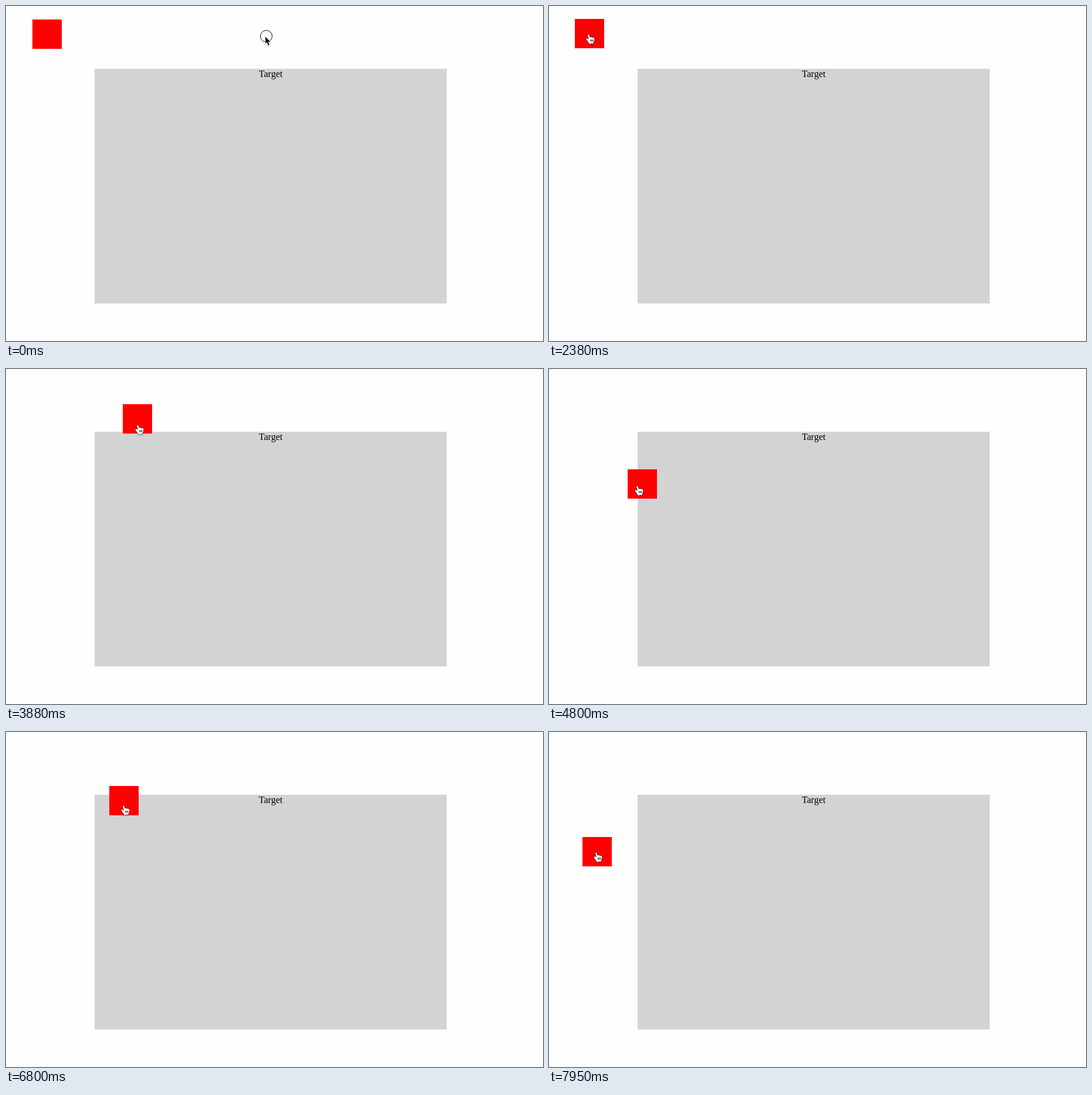
These frames come from a looping animation (915 px wide and 571 px high, 8000 ms). An HTML page with a canvas:

```html
<!DOCTYPE html>
<html lang="en">
<head>
<meta charset="utf-8">
<title>Drag and drop</title>
<style>
  html, body { margin: 0; width: 100%; height: 100%; overflow: hidden; background: #fefefe; }
  canvas { display: block; }
</style>
</head>
<body>
<canvas id="stage" width="915" height="571"></canvas>
<script>
const ctx = document.getElementById('stage').getContext('2d');
const LOOP = 8000;
const SIZE = 50;
const REST = { x: 45, y: 23 };
const GRIP = { x: 25, y: 26 };

// The pointer travels to the square, presses, picks it up, then drags it around.
const APPROACH = { start: 60, step: 59.3, count: 29 };
const PRESS = 2200, PICK_UP = 2380;
const DRAG = { start: 3020, step: 57.1 };

// Turning points of the drag: [step, x, y].
const turns = [
  [-1, 44, 22], [7, 114, 5], [12, 173, 26], [15, 199, 60], [22, 194, 116], [31, 134, 171],
  [38, 80, 162], [41, 70, 138], [46, 70, 80], [50, 83, 44], [57, 139, 26],
  [66, 176, 92], [72, 165, 133], [80, 95, 170], [86, 57, 179]
];

const arrow = new Path2D('M0 .5V12L2.6 9.6L4.9 15L6.9 14.2L4.6 8.9H8.4Z');
const hand = new Path2D('M-2.7 12.9L-3.9 10.9L-5.4 9Q-5.7 7-4.1 6.9Q-2.8 7.2-1.4 9.1L-1.7 6.8L-2.8 2.5Q-3 .7-1.7.6' +
  'Q-.6.6-.2 2.4L.5 5.4Q1.6 4 2.8 5.6Q4.6 4.4 5.5 6.3Q8.3 5.3 8.4 8L8 11.5L6.6 14V16.3L4 16L3.2 15L2 16.4H-.6L-1.2 14.8Z');
const creases = new Path2D('M1.8 9.2V12.6M3.8 9.2V12.6M5.8 9.2V12.4');

const clamp = (v, lo, hi) => Math.min(hi, Math.max(lo, v));
const stepAt = ({ start, step }, t) => Math.floor((t - start) / step);

function slope(i, axis) {
  const a = turns[i - 1], b = turns[i + 1];
  return a && b ? (b[axis] - a[axis]) / (b[0] - a[0]) : 0;
}

// Smooth curve through the turning points.
function dragPoint(step) {
  const last = turns.length - 1;
  const s = clamp(step, turns[0][0], turns[last][0]);
  const i = Math.max(1, turns.findIndex(p => p[0] >= s)) - 1;
  const a = turns[i], b = turns[i + 1];
  const span = b[0] - a[0], u = (s - a[0]) / span, v = 1 - u;
  const [x, y] = [1, 2].map(k => Math.round(
    v * v * (1 + 2 * u) * a[k] + u * u * (3 - 2 * u) * b[k] +
    span * u * v * (v * slope(i, k) - u * slope(i + 1, k))));
  return { x, y };
}

// Eased run to the left that dips and rises again near the end.
function approachPoint(t) {
  const u = clamp((stepAt(APPROACH, t) + 1) / APPROACH.count, 0, 1) ** 0.9;
  const e = u * u * (3 - 2 * u);
  return {
    x: Math.round(442 - 373 * e),
    y: Math.round(52 - 4 * e + 200 * e ** 6 * (1 - e))
  };
}

function ring(x, y) {
  ctx.beginPath();
  ctx.arc(x, y, 10, 0, Math.PI * 2);
  ctx.lineWidth = 1;
  ctx.strokeStyle = '#000';
  ctx.stroke();
}

function drawPointer({ x, y }, shape, fill, outline, width) {
  ctx.save();
  ctx.translate(x, y);
  ctx.lineJoin = 'round';
  ctx.lineWidth = width;
  ctx.strokeStyle = outline;
  ctx.fillStyle = fill;
  ctx.shadowColor = 'rgba(0,0,0,.35)';
  ctx.shadowBlur = 2;
  ctx.shadowOffsetY = 1;
  ctx.stroke(shape);
  ctx.shadowColor = 'transparent';
  ctx.fill(shape);
  if (shape === hand) ctx.stroke(creases);
  ctx.restore();
}

function draw(t) {
  const dragging = t >= PICK_UP;
  const step = Math.max(-1, stepAt(DRAG, t));
  const square = dragging ? dragPoint(step) : REST;
  let pointer = approachPoint(t);
  if (dragging) {
    // The square trails the pointer by one step.
    const ahead = dragPoint(step < 0 ? step : step + 1);
    pointer = { x: ahead.x + GRIP.x, y: ahead.y + GRIP.y };
  }

  ctx.fillStyle = '#fefefe';
  ctx.fillRect(0, 0, 915, 571);
  ctx.fillStyle = '#d3d3d3';
  ctx.fillRect(151, 107, 600, 400);
  ctx.fillStyle = '#000';
  ctx.font = '16px "Liberation Serif", serif';
  ctx.textAlign = 'center';
  ctx.fillText('Target', 451, 121);
  ctx.fillStyle = '#f00';
  ctx.fillRect(square.x, square.y, SIZE, SIZE);

  if (t < APPROACH.start) ring(443.5, 51.5);
  if (t >= PRESS && !dragging) ring(69.5, 46.5);

  const overSquare = pointer.x < square.x + SIZE && pointer.y < square.y + SIZE;
  if (dragging || overSquare) drawPointer(pointer, hand, '#fff', '#000', 1);
  else drawPointer(pointer, arrow, '#000', '#fff', 2);
}

const start = performance.now();
function tick() {
  draw((performance.now() - start) % LOOP);
  requestAnimationFrame(tick);
}
tick();
</script>
</body>
</html>
```
